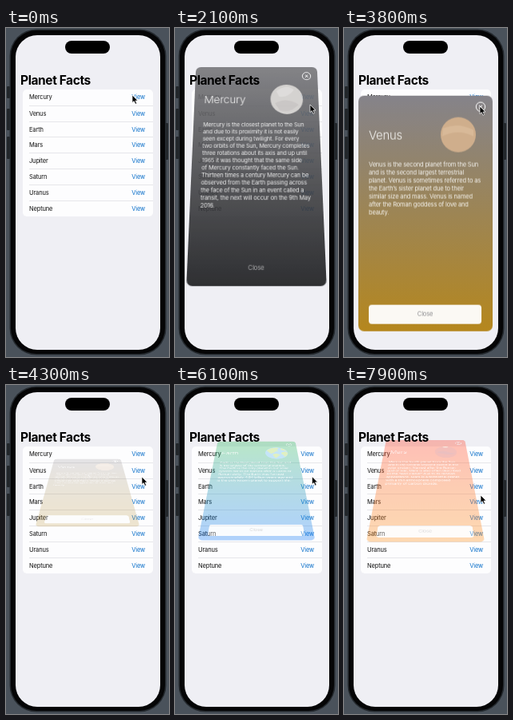
An HTML page for the animation above (8000 ms loop, 204 px wide and 412 px high).

```html
<!DOCTYPE html>
<html lang="en">
<head>
<meta charset="utf-8">
<title>Planet Facts</title>
<style>
  html, body { margin: 0; width: 100%; height: 100%; overflow: hidden; }
  body { position: relative; background: #4a525b; font: 7.5px/10px Inter, sans-serif; letter-spacing: -.16px; }
  div, svg { position: absolute; box-sizing: border-box; }
  .key { background: #22262a; border-radius: 1px; width: 4px; }
  #phone { left: 6px; top: 3px; width: 192.5px; height: 405px; border-radius: 32px; background: #050506; box-shadow: 0 0 0 1.5px #24292e; }
  #screen { left: 11.5px; top: 8.5px; width: 181px; height: 394px; border-radius: 27px; background: #efeff4; }
  #list { left: 20.5px; top: 77px; width: 163px; height: 159px; border-radius: 5px; background: #fdfdfe; }
  .row { left: 8.5px; right: 0; height: 19.8px; line-height: 20.5px; color: #111; }
  .row + .row { border-top: .5px solid #e6e6ea; }
  .row span { position: absolute; right: 9.5px; color: #0b6fc9; }
  #title { left: 18px; top: 55.5px; font-size: 15.5px; line-height: 20px; font-weight: 700; letter-spacing: -.4px; white-space: nowrap; color: #000; }
  #island { left: 74px; top: 15.5px; width: 56px; height: 16px; border-radius: 8px; background: #000; }
  .card { left: 18px; top: 85px; width: 168px; height: 295px; border-radius: 7px; overflow: hidden; color: #fff; }
  .copy { left: 13px; top: 39.5px; white-space: pre; opacity: .9; }
  .copy h2 { margin: 0 0 22px; font-size: 14.8px; line-height: 20px; font-weight: 300; letter-spacing: -.2px; }
  .close { left: 13px; top: 262px; width: 141px; height: 24px; border-radius: 4px; line-height: 24px; text-align: center; }
</style>
</head>
<body>
<div class="key" style="left:1px;top:73px;height:15px"></div>
<div class="key" style="left:1px;top:101px;height:27px"></div>
<div class="key" style="left:1px;top:136px;height:28px"></div>
<div class="key" style="left:199px;top:119px;height:46px"></div>
<div id="phone"></div>
<div id="screen"></div>
<div id="list"></div>
<div id="cards"></div>
<div id="title">Planet Facts</div>
<div id="island"></div>
<svg id="cursor" width="10" height="14" viewBox="-1 -1 10 14">
  <path d="M0 0V9.6L2.2 7.6L3.9 11.3L5.6 10.5L4 7H7Z" stroke="#fff" stroke-width=".7"/>
</svg>
<script>
const LOOP = 8000, STEP = 100;
const $ = id => document.getElementById(id);

const planets = [
  { name: 'Mercury', open: 870, close: 2030, colors: ['#77777b', '#191a1d'],
    button: 'transparent', label: '#a0a0a3',
    art: `<circle r="22" fill="#d0cdcb"/><path d="M-14-12Q0-24 10-14Q2-2-10-4Z" fill="#dbd9d7"/>
      <path d="M-16 6Q0-4 16 8Q4 22-10 16Z" fill="#c5c1c0"/>`,
    text: `Mercury is the closest planet to the Sun
and due to its proximity it is not easily
seen except during twilight. For every
two orbits of the Sun, Mercury completes
three rotations about its axis and up until
1965 it was thought that the same side
of Mercury constantly faced the Sun.
Thirteen times a century Mercury can be
observed from the Earth passing across
the face of the Sun in an event called a
transit, the next will occur on the 9th May
2016.` },
  { name: 'Venus', open: 3020, close: 4085, colors: ['#85838a', '#b5871c'],
    art: `<circle r="22" fill="#cfae8c"/><path d="M-19-8Q0-16 19-6V2Q0-8-20 2Z" fill="#d8b998"/>`,
    text: `Venus is the second planet from the Sun
and is the second largest terrestrial
planet. Venus is sometimes referred to as
the Earth’s sister planet due to their
similar size and mass. Venus is named
after the Roman goddess of love and
beauty.` },
  { name: 'Earth', open: 4830, close: 5920, colors: ['#30bb58', '#157af8'],
    art: `<circle r="23" fill="#55b5ee"/><g fill="#a6d64f">
      <path d="M-20-10Q-12-22 2-22L5-17L0-13L4-8L-3-5L-6 0L-10-1L-8 4L-14 0Z"/>
      <path d="M-8 5Q0 0 7 7L3 13L-2 20L-6 14Z"/>
      <path d="M10-20Q18-16 21-8L15-10L9-13Z"/>
      <path d="M11-3L18-6L23-1Q22 10 16 15L13 7L9 3Z"/></g>`,
    text: `Earth is the third planet from the Sun and
is the largest of the terrestrial planets.
The Earth is the only planet in our solar
system not to be named after a Greek or
Roman deity. The Earth was formed
approximately 4.54 billion years ago and
is the only known planet to support life.` },
  { name: 'Mars', open: 6590, close: 7723, colors: ['#ff4731', '#fb9324'],
    art: `<circle r="22" fill="#e04a3c"/><path d="M-18 1Q-6-8 4 0T20 2Q14 12 0 9T-18 1Z" fill="#c94c4c"/>
      <ellipse cy="-19" rx="6" ry="2" fill="#f5c3a8"/>`,
    text: `Mars is the fourth planet from the Sun
and is the second smallest planet in the
solar system. Named after the Roman
god of war, Mars is also often described
as the “Red Planet” due to its reddish
appearance. Mars is a terrestrial planet
with a thin atmosphere composed
primarily of carbon dioxide.` },
];

$('list').innerHTML = [...planets.map(p => p.name), 'Jupiter', 'Saturn', 'Uranus', 'Neptune']
  .map((name, i) => `<div class="row" style="top:${i * 19.8}px">${name}<span>View</span></div>`).join('');

$('cards').innerHTML = planets.map(p => `
  <div class="card" style="background:linear-gradient(${p.colors})">
    <svg width="168" height="80">
      <g transform="translate(125 49)">${p.art}</g>
      <g transform="translate(153 14)" fill="none" stroke="#fff" stroke-width="1">
        <circle r="5.7"/><path d="M-2-2L2 2M2-2L-2 2"/>
      </g>
    </svg>
    <div class="copy"><h2>${p.name}</h2>${p.text}</div>
    <div class="close" style="background:${p.button || '#fffffff2'};color:${p.label || '#8b8b8e'}">Close</div>
  </div>`).join('');
planets.forEach((p, i) => {
  p.card = $('cards').children[i];
  p.copy = p.card.querySelector('.copy');
});

// time, x, y of the pointer tip
const pointer = [
  [0, 158, 84], [300, 164, 92], [600, 168, 97], [2100, 169, 96], [2400, 165, 112], [2600, 160, 118],
  [2700, 167, 108], [3200, 167, 108], [3700, 170, 98], [4090, 170, 98], [4300, 170, 115],
  [4600, 170, 126], [4900, 170, 126], [5400, 173, 97], [5900, 173, 97], [6450, 169, 146],
  [6650, 169, 146], [7000, 169, 130], [7400, 170, 98], [7720, 170, 98], [7900, 171, 138], [8000, 171, 146],
];

// Critically damped spring, ms -> progress
function spring(ms) {
  const x = Math.max(0, ms) * 0.0114;
  return 1 - (1 + x) * Math.exp(-x);
}

function poseCard(p, t) {
  const opened = spring(t - p.open);
  const shown = opened * (1 - spring(t - p.close));
  p.card.style.display = shown < 0.01 ? 'none' : '';
  const angle = (1 - shown) * Math.PI / 2;
  const sin = Math.sin(angle), cos = Math.cos(angle);
  const scale = 1 - 0.72 * (1 - cos);
  const tilt = -0.25 * sin / 147.5;
  p.card.style.opacity = shown * shown * (3 - 2 * shown);
  p.card.style.transform = `translateY(${-198 * scale * sin}px)
    matrix3d(${scale},0,0,0, 0,${scale * cos},0,${tilt}, 0,0,1,0, 0,0,0,1)`;
  p.copy.style.transform = `translateY(${315 * (1 - opened)}px)`;
}

function posePointer(t) {
  const i = pointer.findIndex(k => k[0] > t);
  const [t0, x0, y0] = pointer[i - 1], [t1, x1, y1] = pointer[i];
  const f = (t - t0) / (t1 - t0);
  $('cursor').style.transform = `translate(${x0 + (x1 - x0) * f - 1}px,${y0 + (y1 - y0) * f - 1}px)`;
}

function draw() {
  const t = Math.floor((performance.now() + 20) / STEP) * STEP % LOOP;
  planets.forEach(p => poseCard(p, t));
  posePointer(t);
  requestAnimationFrame(draw);
}
draw();
</script>
</body>
</html>
```
